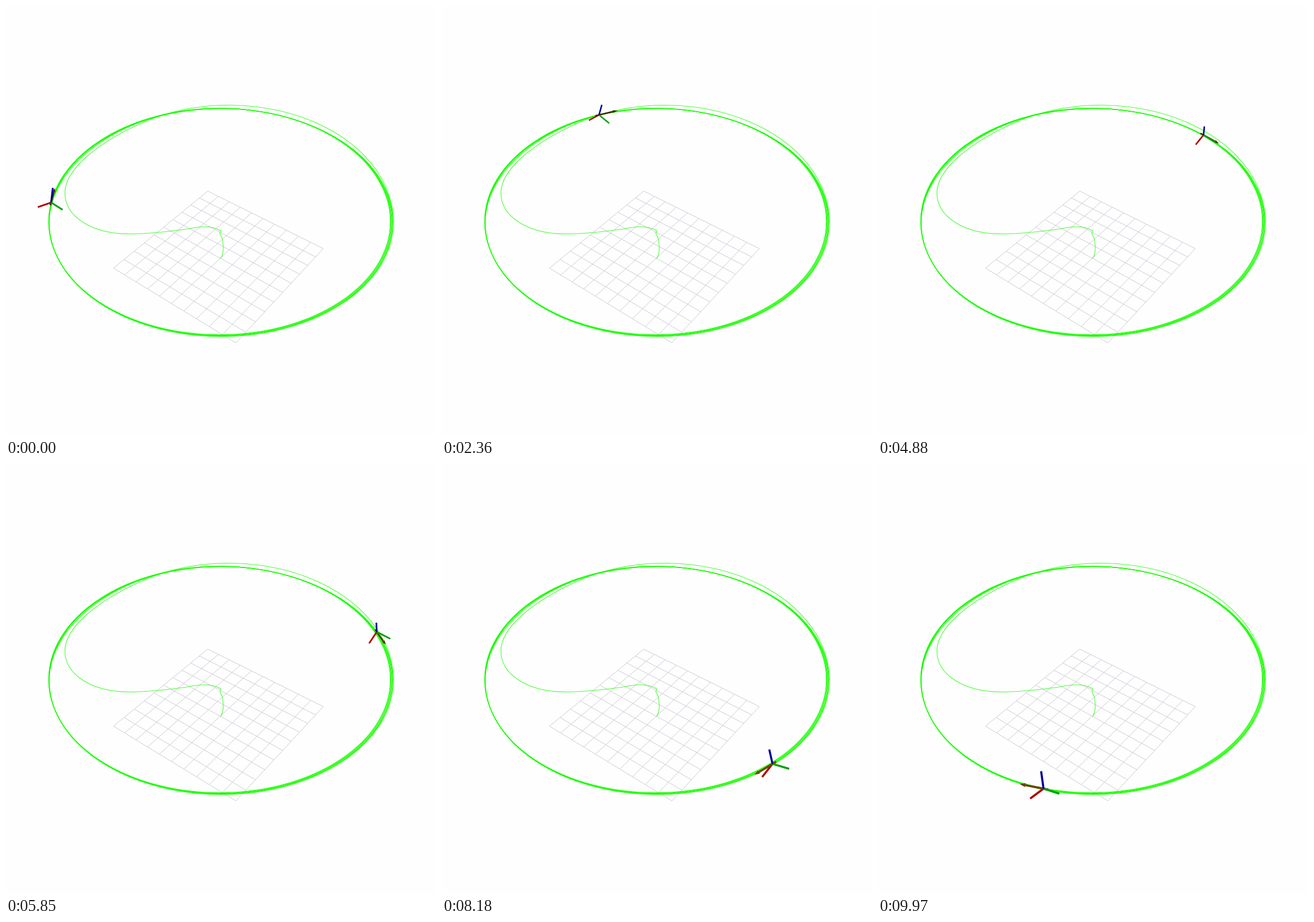
Recreate the animation shown at these times as an HTML page with a canvas. Size 748 by 748 pixels, loop 10 s.

```html
<!DOCTYPE html>
<html>
<head>
<meta charset="utf-8">
<title>Orbiting pose</title>
<style>
html, body { margin: 0; width: 100%; height: 100%; overflow: hidden; background: #fefefe; }
canvas { display: block; width: 748px; height: 748px; }
</style>
</head>
<body>
<canvas id="stage" width="748" height="748"></canvas>
<script>
const SIZE = 748, LOOP = 10000, TAU = 2 * Math.PI;
const ctx = document.getElementById('stage').getContext('2d');
const orbit = { x: 373.5, y: 375.5, rx: 299.5, ry: 197.5 };
const TRACK = 'rgb(25,255,0)';

// Seconds and degrees along the orbit
const passes = [
  [0, 189.8], [2.36, 250.4], [3.85, 285], [5.85, 335],
  [7.12, 373.6], [8.18, 407.7], [9.97, 466.6]
];

function drawGrid(g, [p0, p1, p2, p3], cells) {
  const ax = p1[0] - p2[0], ay = p1[1] - p2[1];
  const bx = p3[0] - p2[0], by = p3[1] - p2[1];
  const sx = p0[0] - ax - p3[0], sy = p0[1] - ay - p3[1];
  const det = ax * by - bx * ay;
  const wu = (sx * by - bx * sy) / det, wv = (ax * sy - sx * ay) / det;
  const project = (u, v) => [0, 1].map(i =>
    (p0[i] + u * (p1[i] - p0[i] + wu * p1[i]) + v * (p3[i] - p0[i] + wv * p3[i])) /
    (1 + wu * u + wv * v));
  g.beginPath();
  for (let i = 0; i <= cells; i++) {
    const s = i / cells;
    g.moveTo(...project(s, 0)); g.lineTo(...project(s, 1));
    g.moveTo(...project(0, s)); g.lineTo(...project(1, s));
  }
  g.strokeStyle = '#cdcbd4';
  g.lineWidth = 1;
  g.stroke();
}

// Take-off, swing out and the wide first lap
function drawApproach(g) {
  g.beginPath();
  g.moveTo(373, 439);
  g.quadraticCurveTo(381, 430, 376, 404);
  g.lineTo(372, 396);
  g.lineTo(373.5, 391);
  g.quadraticCurveTo(354, 379, 318, 387.5);
  g.bezierCurveTo(290, 391, 255, 396.5, 215, 396.5);
  g.bezierCurveTo(150, 396.5, 102.5, 367, 102.5, 325);
  g.bezierCurveTo(102.5, 285, 157, 241, 225, 208.8);
  g.ellipse(388, 376, 286, 203.5, 0, Math.PI + .964, TAU);
  g.stroke();
}

// Repeated laps, each drifting a little
function drawLaps(g, count) {
  for (let n = 0; n < count; n++) {
    const drift = 2 * n / (count - 1) - 1;
    g.beginPath();
    g.ellipse(372.9 + 1.5 * drift, 375.8 + .9 * drift,
      298.2 + drift, 197.6 + .6 * drift, 0, 0, TAU);
    g.stroke();
  }
}

function makeScene() {
  const layer = document.createElement('canvas');
  layer.width = layer.height = SIZE;
  const g = layer.getContext('2d');
  g.fillStyle = '#fefefe';
  g.fillRect(0, 0, SIZE, SIZE);
  drawGrid(g, [[351, 322], [552, 422], [400, 586], [187, 456]], 10);
  g.strokeStyle = TRACK;
  g.lineWidth = 1.1;
  drawLaps(g, 5);
  g.beginPath();
  g.moveTo(75, 372);
  g.bezierCurveTo(80, 293, 155, 228, 245, 198);
  g.stroke();
  g.globalAlpha = .8;
  drawApproach(g);
  return layer;
}

// Smooth curve through the passes, slopes taken from the neighbours
function orbitAngle(t) {
  const i = Math.max(0, passes.findLastIndex(p => p[0] <= t && p !== passes.at(-1)));
  const a = passes[i], b = passes[i + 1];
  const before = passes[i - 1] || a, after = passes[i + 2] || b;
  const span = b[0] - a[0], s = Math.min(1, (t - a[0]) / span), d = b[1] - a[1];
  const ma = (b[1] - before[1]) / (b[0] - before[0]) * span;
  const mb = (after[1] - a[1]) / (after[0] - a[0]) * span;
  const angle = a[1] + s * (ma + s * (3 * d - 2 * ma - mb + s * (ma + mb - 2 * d)));
  return angle * Math.PI / 180;
}

function rod(dx, dy, width, color, x = 0, y = 0) {
  ctx.beginPath();
  ctx.moveTo(x, y);
  ctx.lineTo(dx, dy);
  ctx.lineWidth = width;
  ctx.strokeStyle = color;
  ctx.stroke();
}

function drawArrow(dx, dy, width, light) {
  const len = Math.hypot(dx, dy), ux = dx / len, uy = dy / len;
  const neck = len * .75, half = width * .95;
  const color = `rgb(${112 * light},${78 * light},0)`;
  rod(ux * neck, uy * neck, width, color, -dx * .2, -dy * .2);
  ctx.beginPath();
  ctx.moveTo(dx, dy);
  ctx.lineTo(ux * neck - uy * half, uy * neck + ux * half);
  ctx.lineTo(ux * neck + uy * half, uy * neck - ux * half);
  ctx.fillStyle = color;
  ctx.fill();
}

const scene = makeScene();

function draw(t) {
  const a = orbitAngle(t), cos = Math.cos(a), sin = Math.sin(a);
  // Perspective makes every projected length vary with the place on the orbit
  const vary = (mean, side, near) => mean + side * cos + near * sin;
  const width = vary(3.1, 0, .6), reach = vary(.13, 0, .017);
  ctx.drawImage(scene, 0, 0);
  ctx.save();
  ctx.translate(orbit.x + orbit.rx * cos, orbit.y + orbit.ry * sin);
  rod(vary(-18.9, 4.7, -3.1), vary(15.4, 6.8, 3.9), width, '#b00000');
  drawArrow(-orbit.rx * sin * reach, orbit.ry * cos * reach, width, vary(.75, .1, .2));
  rod(vary(23.4, 2.5, 5.2), vary(11.4, -.9, -3), width, '#00a00a');
  rod(vary(-.4, -2.6, -4.7), vary(-22.6, 4, -6.8), width, '#000096');
  ctx.restore();
}

function tick() {
  draw(performance.now() % LOOP / 1000);
  requestAnimationFrame(tick);
}
tick();
</script>
</body>
</html>
```
